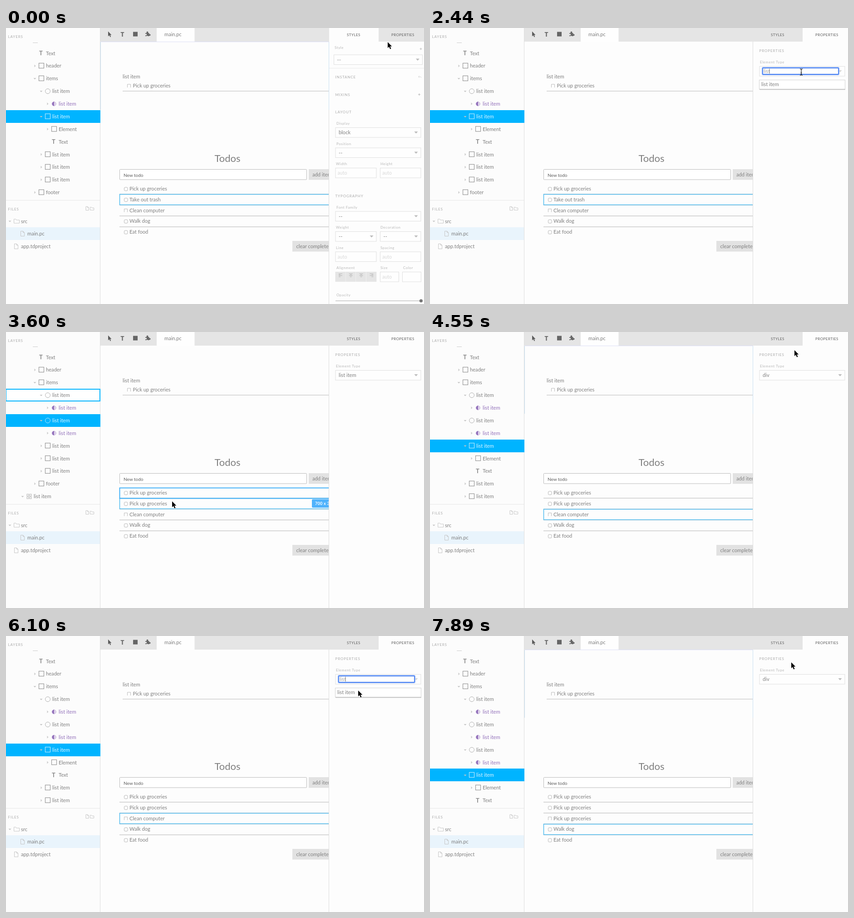
An HTML page for the animation above (8000 ms loop, 921 by 608 pixels).

```html
<!DOCTYPE html>
<html lang="en">
<head>
<meta charset="utf-8">
<title>Todo editor</title>
<style>
html, body { margin: 0; width: 100%; height: 100%; overflow: hidden; background: #fdfdfd; }
svg { display: block; width: 100vw; height: 100vh; }
text { font: 11.15px Lato, "Open Sans", sans-serif; fill: #7f7f7f; white-space: pre; }
.head { font-size: 8px; letter-spacing: .9px; fill: #ababab; }
.label { font-size: 8px; letter-spacing: .55px; fill: #b6b6b6; }
.tab { font-size: 8px; letter-spacing: .45px; fill: #5c5c5c; text-anchor: middle; }
.title { font-size: 21.9px; text-anchor: middle; }
.field { font-size: 10px; fill: #5c5c5c; }
.badge { font-size: 9px; font-weight: 700; letter-spacing: .3px; fill: #fff; }
.pale { font-size: 10.6px; fill: #d8d8d8; }
.typed { fill: #a5a5a5; }
.purple { fill: #9270ba; }
.light { fill: #e2f5ff; }
.glyph { font-weight: 700; font-size: 13px; text-anchor: middle; fill: #8a8a8a; }
.tool { font-weight: 900; font-size: 13px; text-anchor: middle; fill: #666; }
</style>
</head>
<body>
<svg viewBox="0 0 921 608"><g id="scene"></g><g id="pointer"></g></svg>
<script>
const LOOP = 8000, ROW = 27.87, ITEM = 23.8, BLUE = '#00b4ff', GREY = '#e5e5e5';

// Drawing helpers
const text = (x, cy, s, cls = '', drop = 4) => `<text class="${cls}" x="${x}" y="${cy + drop}">${s}</text>`;
const head = (x, cy, s) => text(x, cy, s, 'head', 3);
const label = (x, cy, s) => text(x, cy, s, 'label', 3);
const rect = (x, y, w, h, fill, stroke = 'none', sw = 1, r = 0) =>
  `<rect x="${x}" y="${y}" width="${w}" height="${h}" rx="${r}" fill="${fill}" stroke="${stroke}" stroke-width="${sw}"/>`;
const line = (d, stroke, sw = 1, fill = 'none') => `<path d="${d}" fill="${fill}" stroke="${stroke}" stroke-width="${sw}"/>`;
const shape = (d, fill) => `<path d="${d}" fill="${fill}"/>`;
const box = (x, y, w, h = 21.5) => rect(x + .5, y + .5, w - 1, h, '#fefefe', '#dfdfdf');
const downArrow = (x, y, fill = '#bcbcbc') => shape(`M${x - 4} ${y - 2}h8l-4 4.5z`, fill);
const select = (x, y, w, value, arrow) =>
  box(x, y, w) + text(x + 7.5, y + 11, value) + downArrow(x + w - 11, y + 11, arrow);
const input = (x, y, w, value = 'auto') => box(x, y, w) + text(x + 5, y + 11, value, 'pale');
const plus = (x, y) => line(`M${x - 2.5} ${y}h5M${x} ${y - 2.5}v5`, '#b8b8b8');

// Small icons, centred on x, y
const page = (x, y, s = 1) =>
  line(`M${x - 4 * s} ${y - 5.5 * s}h${5 * s}l${3 * s} ${3 * s}v${8 * s}h${-8 * s}zM${x + s} ${y - 5.5 * s}v${3 * s}h${3 * s}`, '#c6c6c6');
const folder = (x, y, s = 1) =>
  line(`M${x - 6 * s} ${y + 4.5 * s}v${-9 * s}h${4 * s}l${1.5 * s} ${2 * s}h${6.5 * s}v${7 * s}z`, '#c8c8c8');
const twisty = (x, y, open) => open ? shape(`M${x - 3} ${y - 1}h6l-3 3z`, '#c4c4c4') : shape(`M${x - 1} ${y - 3}v6l3-3z`, '#cacaca');
const icons = {
  box: (x, y, c) => rect(x - 5.5, y - 6, 11, 11, 'none', c, 1.2),
  circle: (x, y, c) => `<circle cx="${x}" cy="${y}" r="5.4" fill="none" stroke="${c}"/>`,
  half: (x, y) => `<circle cx="${x}" cy="${y}" r="4.3" fill="#e2d8ed" stroke="#c3afd9"/>` +
    shape(`M${x} ${y - 4.8}a4.8 4.8 0 0 0 0 9.6z`, '#9675bd'),
  type: (x, y) => text(x - 1, y, 'T', 'glyph', 4.5),
  grid: (x, y) => [[-5, -5], [1, -5], [-5, 1], [1, 1]].map(([a, b]) => rect(x + a, y + b, 4, 4, 'none', '#b5b5b5')).join('')
};

// Layer tree rows: x, icon, name, arrow (1 open, 0 closed), item index
function layerRows({ done, sel }) {
  const rows = [[88, 'type', 'Text'], [88, 'box', 'header', 0], [88, 'box', 'items', 1]];
  for (let i = 0; i < 5; i++) {
    const instance = i < done, open = instance || i === sel;
    rows.push([102, instance ? 'circle' : 'box', 'list item', +open, i]);
    if (instance) rows.push([116, 'half', 'list item', 0]);
    else if (open) rows.push([116, 'box', 'Element', 0], [116, 'type', 'Text']);
  }
  rows.push([88, 'box', 'footer', 0], [61, 'grid', 'list item', 1]);
  return rows.slice(0, 12);
}

function leftPanel(s) {
  let out = rect(0, 0, 207, 608, '#fcfcfc') + line('M207.5 0v608', '#dedede') +
    head(4.5, 18.5, 'LAYERS') + line('M59 32.5h11', '#ccc');
  layerRows(s).forEach(([x, icon, name, arrow, item], i) => {
    const cy = 55.6 + ROW * i, top = Math.round(cy - 14);
    const active = item !== undefined && item === s.sel;
    if (active) out += rect(0, top, 208, 28, BLUE);
    if (item !== undefined && item === s.hover && !active) out += rect(0, top + 1, 207, 26, '#fff', BLUE, 2);
    if (arrow !== undefined) out += twisty(x - 24.5, cy, arrow);
    out += icons[icon](x - 10, cy, active ? '#b8e8ff' : icon === 'circle' ? '#b0b0b0' : '#989898');
    out += text(x, cy, name, active ? 'light' : icon === 'half' ? 'purple' : '');
  });
  return out + line('M0 379.5h207', '#e6e6e6') + head(4.5, 398.5, 'FILES') + page(179, 397.5, .75) + folder(189.5, 398, .7) +
    rect(0, 439, 207, 28, '#e9f4fc') +
    twisty(8.5, 425.5, 1) + folder(23.5, 425.5) + text(33, 425.5, 'src') +
    page(36.5, 453) + text(47, 453, 'main.pc') + page(22.5, 481) + text(33, 481, 'app.tdproject');
}

function toolbar() {
  return rect(208, 0, 713, 30, GREY) + rect(332, 0, 83.5, 30, '#fefefe') +
    shape('M225 7.5v11l2.6-2.4 1.9 4 1.8-.9-1.9-3.8h3.2z', '#5c5c5c') +
    text(256.5, 14, 'T', 'tool', 4.5) + rect(280, 8.5, 10, 10, '#666') +
    shape('M307 11h3a2 2 0 1 1 3 0h2.5v3a1.8 1.8 0 1 1 0 2.5V18h-3a1.7 1.7 0 0 0-3 0H307v-2.5a1.8 1.8 0 1 0 0-2z', '#666') +
    text(349, 13.5, 'main.pc');
}

const check = (x, cy, open) => open
  ? line(`M${x + .5} ${cy + 4}v-7h7v7`, '#bcbcbc')
  : rect(x + .5, cy - 3, 7.5, 7.5, '#fff', '#b5b5b5', 1, 2);

function stage(s) {
  const names = ['Pick up groceries', 'Take out trash', 'Clean computer', 'Walk dog', 'Eat food'];
  let out = text(257, 107, 'list item') + check(267, 127, true) + text(279.5, 127, names[0]) +
    line('M257 139h460', '#cfcfcf', 1.5) + text(488, 287, 'Todos', 'title', 8) +
    rect(250.5, 311.5, 412, 22.5, '#fff', '#bababa', 1, 1) + text(259, 323.5, 'New todo', 'field') +
    rect(667, 311, 60, 23.5, '#e2e2e2') + text(675, 322.5, 'add item');
  const top = i => Math.round(342.6 + ITEM * i);
  names.forEach((name, i) => {
    const cy = 354 + ITEM * i;
    out += check(260, cy, i === 2) + text(272, cy, i < s.done ? names[0] : name);
    if (i < 4) out += line(`M250 ${top(i + 1)}h470`, '#cbcbcb', 1.3);
  });
  const frame = (i, color, w) => rect(250.5, top(i) + .5, 700, 23, 'none', color, w);
  out += rect(631, 469, 90, 23.5, '#e2e2e2') + text(639.5, 480.5, 'clear completed') + frame(s.sel, '#4fbcf0', 1.5);
  if (s.hover >= 0) {
    const y = top(s.hover + 1) + 2.5;
    out += frame(s.hover, '#45b2f8', 2) + rect(674, y, 60, 18.5, '#50b3fc', 'none', 0, 2) + text(681, y + 9, '700 x 31', 'badge', 3.3);
  }
  return out;
}

function stylesPanel() {
  let out = label(724, 42.5, 'Style') + plus(914, 46) + select(722, 58.5, 196, '--') + line('M712 88.5h209', '#ebebeb') +
    line('M909 107.5h4a2 2 0 0 1 2 2M911 105l-2.5 2.5l2.5 2', '#d8d8d8') + plus(910.5, 146.5);
  for (const [name, y] of [['INSTANCE', 107.5], ['MIXINS', 146.5], ['LAYOUT', 185], ['TYPOGRAPHY', 370]]) out += head(725.5, y, name);
  for (const [name, y, value] of [['Display', 210, 'block'], ['Position', 254.5, '--'], ['Font Family', 394.5, '--']])
    out += label(728, y, name) + select(725.5, y + 9, 189, value);
  const pair = (a, b, y, field, value) => label(727, y, a) + label(825, y, b) +
    field(725.5, y + 9, 91, value) + field(824, y + 9, 90.5, value);
  out += pair('Width', 'Height', 299, input) + pair('Weight', 'Decoration', 439, select, '--') + pair('Line', 'Spacing', 483.5, input);
  out += label(728, 528, 'Alignment') + label(825, 528, 'Size') + label(875, 528, 'Color');
  [0, 1, 1, 2].forEach((shift, i) => {
    const x = 725.5 + 22.8 * i, wide = x + 7.5, narrow = wide + 2 * shift;
    out += rect(x, 537, 22.4, 22, GREY) +
      line(`M${wide} 541.5h8M${narrow} 543.5h4M${wide} 545.5h8M${narrow} 548h4`, '#b4b4b4');
  });
  return out + input(824, 537, 42) + box(873, 537, 42) + label(728, 587.5, 'Opacity') +
    rect(726, 600, 188, 2, '#d2d2d2') + '<circle cx="914.5" cy="601" r="3.6" fill="#777"/>';
}

const menus = {
  all: ['list item', 'a', 'abbr', 'acronym', 'address', 'applet', 'area', 'article', 'aside'],
  l: ['list item', 'applet', 'blockquote', 'col', 'colgroup', 'dl', 'fieldset', 'html', 'label'],
  one: ['list item']
};

function propertiesPanel(s) {
  let out = head(725.5, 49.5, 'PROPERTIES') + label(727, 75, 'Element Type');
  if (!s.menu) return out + select(725.5, 84, 189, s.sel < s.done ? 'list item' : 'div');
  const options = menus[s.menu], height = Math.min(20 * options.length, 174);
  out += select(725.5, 84, 189, '', '#d5d5d5') +
    rect(732.5, 87.5, 168, 15, '#fff', '#a9c4fb', 3.5, 2) + rect(733, 88, 167, 14, '#fff', '#4b82f0', 1.8, 1) +
    text(735, 95, s.typed, 'typed') + line(`M${735.5 + [0, 3, 5, 9, 12.5][s.typed.length]} 89.5v11`, '#888') +
    rect(725.5, 114.5, 189, height, '#fff', '#d4d4d4') + line(`M726 ${115.5 + height}h189`, '#c4c4c4', 1.5);
  options.forEach((name, i) => {
    if (20 * i + 16 < height) out += text(730, 124 + 20 * i, name);
  });
  return out;
}

function rightPanel(s) {
  const props = s.tab === 'properties';
  return rect(712, 30, 209, 578, '#fdfdfd') +
    (props ? rect(821, 0, 100, 30, '#fdfdfd') : rect(712, 0, 109, 30, '#fdfdfd')) +
    text(766, 14.5, 'STYLES', 'tab', 3) + text(874.5, 14.5, 'PROPERTIES', 'tab', 3) +
    line('M711.5 30v578', '#dcdcdc') + (props ? propertiesPanel(s) : stylesPanel()) +
    (s.edge ? line('M208.5 30.5h503', '#dcdff6') + line('M208.5 180V31M711.5 180V31', '#c9e0f2') : '');
}

// Steps: time, pointer position and what changes there
const steps = [];
let last = { done: 1, sel: 1, hover: -1, tab: 'styles', edge: true, menu: '', typed: '', pointer: 'arrow' };
function at(time, x, y, change) {
  last = { ...last, ...change, time, x, y };
  steps.push(last);
}
at(0, 841, 31);
at(90, 867, 13);
at(270, 867, 13, { tab: 'properties', edge: false });
at(570, 867, 17);
at(720, 860, 30);
at(840, 842, 62);
at(960, 828, 88, { pointer: 'beam' });
at(1070, 822, 100);
at(1280, 822, 100, { menu: 'all' });
at(2030, 822, 100, { menu: 'l', typed: 'l', pointer: 'none' });
at(2140, 822, 100, { menu: 'one', typed: 'lis' });
at(2440, 818, 97, { typed: 'list', pointer: 'beam' });
at(2550, 812, 102);
at(2660, 803, 112, { pointer: 'arrow' });
at(2770, 798, 119);
at(2880, 795, 122);
at(2990, 795, 122, { menu: '', typed: '', done: 2 });
at(3090, 795, 124);
at(3270, 690, 205);
at(3380, 540, 300);
at(3490, 420, 352);
at(3600, 366, 373, { hover: 0 });
at(3750, 368, 394, { hover: 2 });
at(3870, 370, 398);
at(3990, 370, 398, { sel: 2 });
at(4230, 480, 320, { hover: -1 });
at(4310, 650, 180, { edge: true });
at(4400, 767, 75);
at(4550, 803, 40);
at(4660, 812, 50, { edge: false });
at(4770, 817, 66);
at(4880, 819, 82);
at(4990, 819, 92, { pointer: 'beam' });
at(5100, 819, 97);
at(5320, 819, 97, { menu: 'all' });
at(5710, 819, 97, { menu: 'l', typed: 'l', pointer: 'none' });
at(5800, 819, 97, { menu: 'one', typed: 'lis' });
at(6100, 776, 120, { typed: 'list', pointer: 'arrow' });
at(6220, 771, 124);
at(6460, 769, 126);
at(6640, 769, 126, { menu: '', typed: '', done: 3 });
at(6730, 690, 225);
at(6880, 560, 372, { hover: 1 });
at(7000, 514, 446, { hover: 3 });
at(7120, 507, 449, { hover: 4 });
at(7240, 506, 430, { hover: 3 });
at(7360, 506, 428, { sel: 3 });
at(7530, 570, 330, { hover: -1 });
at(7640, 680, 170, { edge: true });
at(7740, 760, 85);
at(7890, 796, 58);

const pointers = {
  arrow: '<path d="M0 0V13L3 10.3L5.3 15.5L7.5 14.5L5.2 9.4H9.3Z" stroke="#fff" stroke-width="1.6" paint-order="stroke"/>',
  beam: line('M-3-7q3 0 3 2v10q0 2-3 2M3-7q-3 0-3 2v10q0 2 3 2M-1.5 2h3', '#111', 1.2),
  none: ''
};
const scene = document.getElementById('scene'), pointer = document.getElementById('pointer');
let shown;

function render(now) {
  const t = now % LOOP, s = steps.findLast(step => step.time <= t) || steps[0];
  if (s !== shown) {
    scene.innerHTML = toolbar() + stage(s) + leftPanel(s) + rightPanel(s);
    pointer.innerHTML = pointers[s.pointer];
    pointer.setAttribute('transform', `translate(${s.x} ${s.y})`);
    shown = s;
  }
}

const start = performance.now();
function tick() {
  render(performance.now() - start);
  requestAnimationFrame(tick);
}
tick();
</script>
</body>
</html>
```
